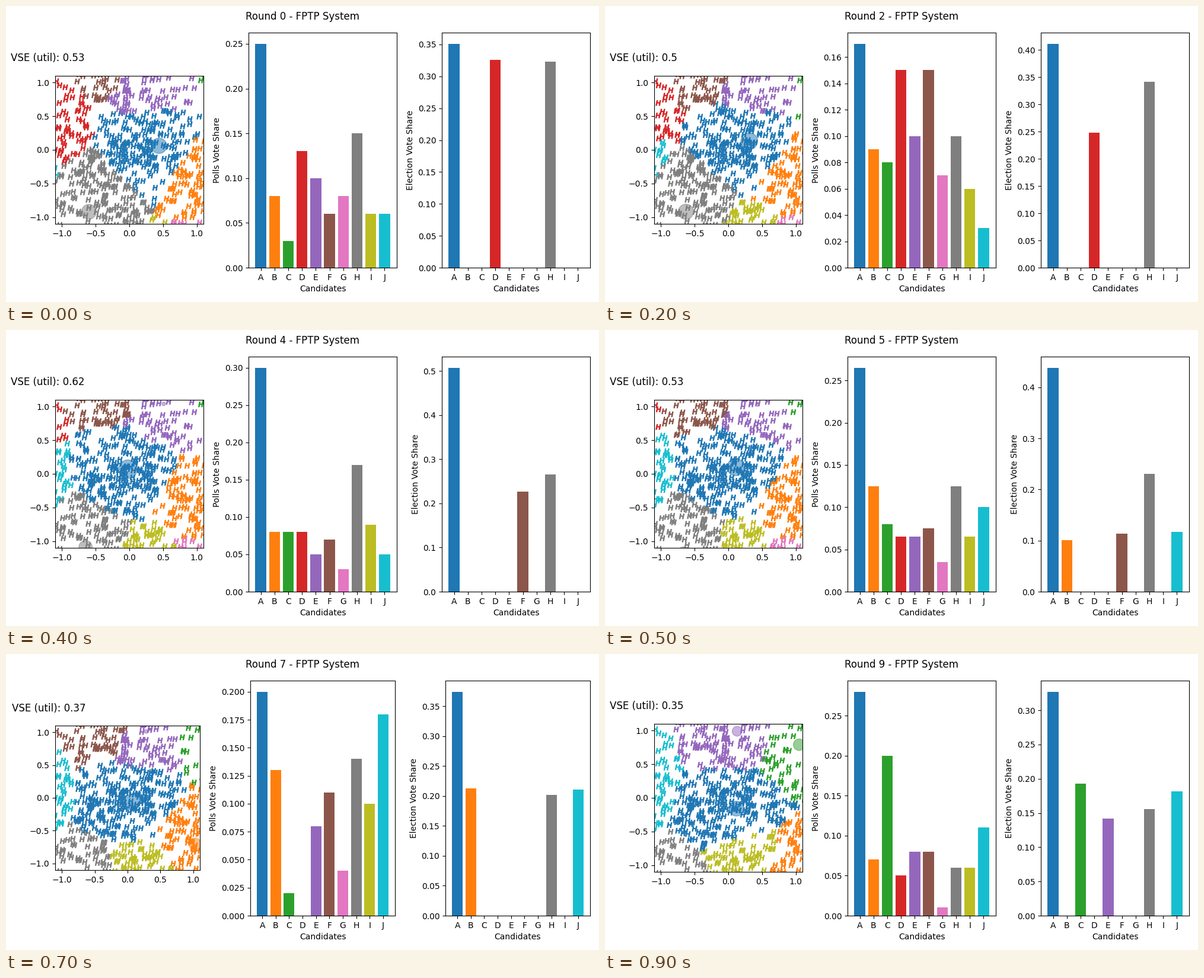
A matplotlib script for the animation above (1 s loop, 1000 by 500 pixels).

```python
import numpy as np
import matplotlib.pyplot as plt
from matplotlib.animation import FuncAnimation

W, H, DPI = 1000, 500, 100
ROUNDS = 10
NAMES = list("ABCDEFGHIJ")
COLORS = np.array(plt.get_cmap("tab10").colors)

# Chart data per round: VSE, poll percents A to J, votes out of 1000.
# Rounds without an entry are interpolated.
RESULTS = {
    0: (0.53, (25, 8, 3, 13, 10, 6, 8, 15, 6, 6), dict(A=351, D=326, H=323)),
    1: (0.47, (18, 6, 5, 15, 9, 9, 7, 13, 12, 6), dict(A=311, D=254, E=186, H=249)),
    2: (0.50, (17, 9, 8, 15, 10, 15, 7, 10, 6, 3), dict(A=411, D=248, H=341)),
    4: (0.62, (30, 8, 8, 8, 5, 7, 3, 17, 9, 5), dict(A=507, F=227, H=266)),
    6: (0.43, (23, 17, 8, 5, 8, 8, 4, 8, 4, 15), dict(A=369, B=201, H=196, J=234)),
    7: (0.37, (20, 13, 2, 0, 8, 11, 4, 14, 10, 18), dict(A=374, B=213, H=202, J=211)),
    9: (0.35, (28, 7, 20, 5, 8, 8, 1, 6, 6, 11),
        dict(A=327, C=193, E=142, H=156, J=182)),
}

# Key points (round, x, y) of each candidate's drift
PATHS = dict(
    A=[(0, .44, .06), (2, .31, .13), (4, -.02, .07), (6, .24, .13),
       (7, .07, -.06), (9, .12, -.16)],
    B=[(0, 1.12, -.36), (6, 1.12, -.5), (9, .84, -1.11)],
    C=[(0, 1.65, 1.05), (6, 1.25, 1.3), (9, 1.05, .79)],
    D=[(0, -1.45, .45), (9, -2.2, 1.7)],
    E=[(0, .4, 1.1), (4, .51, 1.04), (9, .13, .99)],
    F=[(0, -.25, 1.55), (7, -.25, 1.25), (9, -.95, 2.0)],
    G=[(0, 1.35, -1.55), (6, 1.0, -1.4), (9, 1.6, -2.2)],
    H=[(0, -.6, -.92), (2, -.63, -.92), (9, -.7, -1.52)],
    I=[(0, .4, -1.95), (2, .3, -1.55), (6, .2, -1.37), (9, .37, -1.0)],
    J=[(0, -1.8, -.4), (9, -1.65, .3)],
)

VOTERS = np.random.default_rng(7).normal(size=(1000, 2))


def candidates(n):
    keys = [np.transpose(PATHS[c]) for c in NAMES]
    return np.array([(np.interp(n, t, x), np.interp(n, t, y)) for t, x, y in keys])


def results(n):
    """Row of VSE, ten poll shares and ten vote shares."""
    rows = [np.hstack([vse, np.array(polls) / 100,
                       [votes.get(c, 0) / 1000 for c in NAMES]])
            for vse, polls, votes in RESULTS.values()]
    row = np.array([np.interp(n, list(RESULTS), col) for col in np.transpose(rows)])
    return row[0], row[1:11], row[11:]


fig = plt.figure(figsize=(W / DPI, H / DPI), dpi=DPI)
title = fig.suptitle("", y=0.982)
ax_map, ax_polls, ax_vote = (fig.add_axes([0.1 + 0.3 * i, 0.1, 0.2, 0.8])
                             for i in range(3))


def place(ax, x, y, w, h):
    ax.set_position([x / W, y / H, w / W, h / H])


def layout(wide_labels):
    w = 244 if wide_labels else 250
    place(ax_map, 83, 257 - w / 2, w, w)
    place(ax_polls, 412 if wide_labels else 409, 58, w, 397)
    place(ax_vote, 985 - w, 58, w, 397)


def draw_map(sites, shares, vse):
    ax_map.clear()
    dist = np.linalg.norm(VOTERS[:, None] - sites[None], axis=2)
    ax_map.scatter(*VOTERS.T, marker="$H$", c=COLORS[dist.argmin(axis=1)])
    ax_map.scatter(*sites.T, s=np.maximum(1000 * shares, 20), c=COLORS, alpha=0.5)
    ticks = np.arange(-1, 1.1, 0.5)
    ax_map.set(xticks=ticks, yticks=ticks, xlim=(-1.1, 1.1), ylim=(-1.1, 1.1))
    ax_map.text(-0.3, 1.1, f"VSE (util): {round(float(vse), 2)}",
                transform=ax_map.transAxes, fontsize=12)


def draw_bars(ax, shares, label):
    ax.clear()
    ax.bar(NAMES, shares, color=COLORS)
    ax.set(xlabel="Candidates", ylabel=label)


def draw(n):
    vse, polls, shares = results(n)
    title.set_text(f"Round {n} - FPTP System")
    layout(0.175 < polls.max() < 0.21)
    draw_map(candidates(n), shares, vse)
    draw_bars(ax_polls, polls, "Polls Vote Share")
    draw_bars(ax_vote, shares, "Election Vote Share")
    return []


anim = FuncAnimation(fig, draw, frames=ROUNDS, interval=100, repeat=True,
                     repeat_delay=0, blit=False)
plt.show()
```
